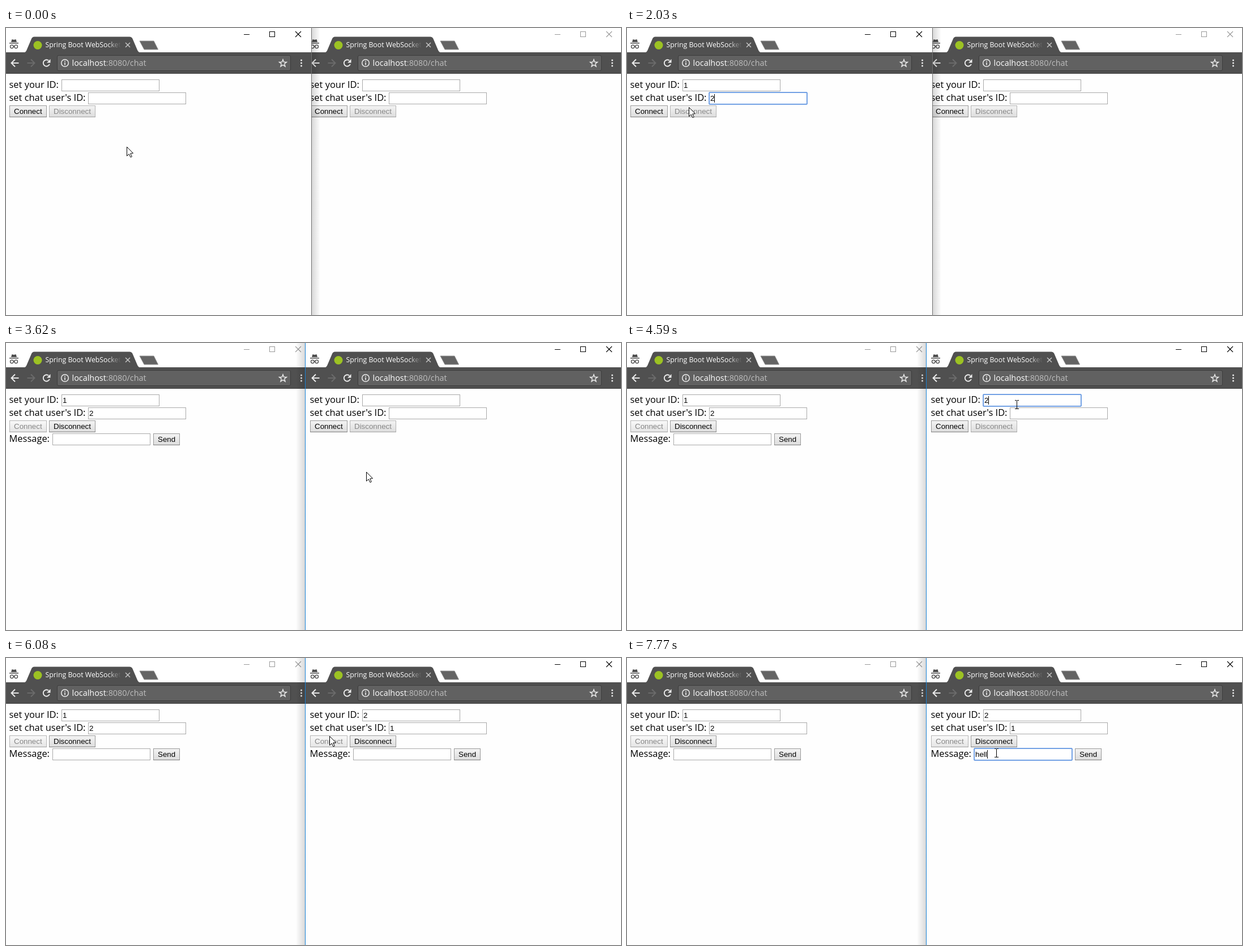
Recreate the animation shown at these times as an HTML page with a canvas. Size 1086 by 508 pixels, loop 8 s.

```html
<!DOCTYPE html>
<html lang="en">
<head>
<meta charset="utf-8">
<title>WebSocket chat</title>
<style>
html, body { margin: 0; width: 100%; height: 100%; overflow: hidden; background: #fff; }
canvas { display: block; width: 1086px; height: 508px; }
</style>
</head>
<body>
<canvas id="stage" width="1086" height="508"></canvas>
<script>
const ctx = document.getElementById('stage').getContext('2d', { alpha: false });
const LOOP = 8000, W = 1086, H = 508;
const UI = '"Open Sans", "Noto Sans", sans-serif';
const FORM = '13.333px "Liberation Sans", Arial, sans-serif';

// Pointer positions: time, x, y, shape. Each one holds until the next.
const pointer = [
  [0, 213, 210, 'arrow'], [150, 206, 166, 'arrow'], [270, 196, 122, 'beam'], [390, 191, 92, 'beam'],
  [670, 192, 107, 'beam'], [1360, 198, 121, 'beam'],
  [1900, 156, 134, 'arrow'], [2030, 109, 140, 'arrow'], [2180, 76, 145, 'arrow'],
  [2310, 54, 148, 'arrow'], [2440, 44, 149, 'arrow'], [2840, 90, 158, 'arrow'],
  [2960, 220, 184, 'arrow'], [3080, 352, 206, 'arrow'], [3230, 470, 219, 'arrow'],
  [3360, 572, 226, 'arrow'], [3490, 636, 228, 'arrow'],
  [3770, 656, 194, 'arrow'], [3910, 678, 142, 'arrow'], [4050, 688, 109, 'beam'],
  [4740, 691, 117, 'beam'], [4870, 695, 124, 'beam'],
  [5420, 660, 134, 'arrow'], [5550, 612, 137, 'arrow'], [5680, 584, 138, 'arrow'], [5810, 571, 138, 'arrow'],
  [6390, 606, 170, 'arrow'], [6540, 652, 168, 'beam']
];
// Focused field over time: window 0 or 1, then field name.
const focus = [[0, -1, ''], [820, 0, 'id'], [1640, 0, 'peer'], [2720, -1, ''],
  [4190, 1, 'id'], [5010, 1, 'peer'], [6080, -1, ''], [6690, 1, 'msg']];
const windows = [
  { o: 0, e: 0, left: 0, right: 540, id: [[0, ''], [950, '1']], peer: [[0, ''], [1770, '2']],
    msg: [[0, '']], hover: 2310, joined: 2720 },
  { o: 531, e: 549, left: 528, right: W, id: [[0, ''], [4470, '2']], peer: [[0, ''], [5290, '1']],
    msg: [[0, ''], [7350, 'h'], [7490, 'he'], [7630, 'hel'], [7770, 'hell']], hover: 5680, joined: 6080 }
];
const SWITCH = 3620;

function at(list, t) {
  let cur = list[0];
  for (const k of list) if (k[0] <= t) cur = k;
  return cur;
}
function rect(x, y, w, h, fill) { ctx.fillStyle = fill; ctx.fillRect(x, y, w, h); }
function frame(x, y, w, h, color) {
  ctx.strokeStyle = color; ctx.lineWidth = 1;
  ctx.strokeRect(x + .5, y + .5, w - 1, h - 1);
}
function text(s, x, y, font, fill) {
  ctx.font = font; ctx.fillStyle = fill;
  ctx.fillText(s, x, y);
}
function path(points, closed) {
  ctx.beginPath();
  for (let i = 0; i < points.length; i += 2) ctx.lineTo(points[i], points[i + 1]);
  if (closed) ctx.closePath();
}
function line(points, color, width = 1) {
  path(points); ctx.strokeStyle = color; ctx.lineWidth = width; ctx.stroke();
}
function poly(points, color) { path(points, true); ctx.fillStyle = color; ctx.fill(); }
function disc(x, y, r, color) {
  ctx.beginPath(); ctx.arc(x, y, r, 0, 7); ctx.fillStyle = color; ctx.fill();
}
function ring(x, y, r, color, width, from = 0, to = Math.PI * 2) {
  ctx.beginPath(); ctx.arc(x, y, r, from, to);
  ctx.strokeStyle = color; ctx.lineWidth = width; ctx.stroke();
}
function vGrad(y, h, top, bottom) {
  const g = ctx.createLinearGradient(0, y, 0, y + h);
  g.addColorStop(0, top); g.addColorStop(1, bottom);
  return g;
}

function tabStrip(o, e, active) {
  // spy glyph
  poly([o + 9, 25, o + 10.5, 20, o + 13, 20.7, o + 15, 20.7, o + 17.5, 20, o + 19, 25], '#4a4a4a');
  rect(o + 6, 26, 16, 1.5, '#4a4a4a');
  ring(o + 10.3, 33, 2.8, '#4a4a4a', 1.3);
  ring(o + 17.7, 33, 2.8, '#4a4a4a', 1.3);
  line([o + 13, 32.4, o + 15, 32.4], '#4a4a4a', 1.2);

  ctx.save();
  ctx.translate(o, 0);
  ctx.beginPath();
  ctx.moveTo(31, 44);
  ctx.quadraticCurveTo(35, 43, 36.5, 39);
  ctx.lineTo(45, 19);
  ctx.quadraticCurveTo(46.5, 15.5, 50, 15.5);
  ctx.lineTo(218, 15.5);
  ctx.quadraticCurveTo(222, 15.5, 223.5, 19);
  ctx.lineTo(232, 39);
  ctx.quadraticCurveTo(233.5, 43, 238, 44);
  ctx.fillStyle = '#505050'; ctx.fill();
  disc(56, 30.5, 7.5, '#9cc223');
  const fade = ctx.createLinearGradient(180, 0, 203, 0);
  fade.addColorStop(0, '#fff'); fade.addColorStop(1, 'rgba(255,255,255,0)');
  text('Spring Boot WebSocket', 69.5, 34, '12.3px ' + UI, fade);
  line([211, 26, 219, 34], '#c8c8c8', 1.5);
  line([219, 26, 211, 34], '#c8c8c8', 1.5);
  ctx.lineJoin = 'round';
  path([236, 23, 261, 23, 268.5, 38, 244, 38], true);
  ctx.fillStyle = '#646464'; ctx.fill();
  ctx.strokeStyle = '#8c8c8c'; ctx.lineWidth = 1; ctx.stroke();
  ctx.restore();

  const c = active ? '#000' : '#999';
  rect(e + 420, 11, 10, 1, c);
  frame(e + 465, 6, 10, 10, c);
  line([e + 511, 6, e + 521, 16], c, 1.1);
  line([e + 521, 6, e + 511, 16], c, 1.1);
}

function arrowIcon(x, dir, color) {
  line([x - 6.5 * dir, 62, x + 6 * dir, 62], color, 1.9);
  line([x, 55.5, x + 6.5 * dir, 62, x, 68.5], color, 1.9);
}

function toolbar(o, e, left, right) {
  rect(left, 43, right - left, 38, '#505050');
  rect(left, 80, right - left, 1, '#414141');
  const x = o + 90, w = e + 503 - x;
  ctx.beginPath(); ctx.roundRect(x + .5, 48.5, w - 1, 27, 2.5);
  ctx.fillStyle = '#616161'; ctx.fill();
  ctx.strokeStyle = '#3c3c3c'; ctx.lineWidth = 1; ctx.stroke();

  arrowIcon(o + 16, -1, '#eee');
  arrowIcon(o + 44, 1, '#6c6c6c');
  ring(o + 71.5, 62, 5.7, '#eee', 1.9, .35, 5.4);
  poly([o + 78.5, 55, o + 78.5, 61.5, o + 72, 61.5], '#eee');

  ring(o + 104, 62, 6.3, '#eee', 1.5);
  rect(o + 103.2, 61, 1.6, 4.6, '#eee');
  rect(o + 103.2, 58.2, 1.6, 1.7, '#eee');
  const font = '14.4px ' + UI;
  text('localhost', o + 116.5, 67, font, '#fff');
  const host = ctx.measureText('localhost').width;
  text(':8080/chat', o + 116.5 + host, 67, font, '#bdbdbd');

  const star = [];
  for (let i = 0; i < 10; i++) {
    const r = i % 2 ? 2.8 : 6.8, a = i * Math.PI / 5 - Math.PI / 2;
    star.push(e + 489 + r * Math.cos(a), 62.5 + r * Math.sin(a));
  }
  path(star, true);
  ctx.strokeStyle = '#eee'; ctx.lineWidth = 1.4; ctx.stroke();
  for (const y of [57, 62, 67]) disc(e + 521.5, y, 1.5, '#eee');
}

function field(x, y, value, focused, caret) {
  rect(x, y, 173, 21, '#fff');
  frame(x, y, 173, 21, '#a9a9a9');
  if (focused) {
    ctx.beginPath(); ctx.roundRect(x - .5, y - .5, 174, 22, 1.5);
    ctx.strokeStyle = '#86aee8'; ctx.lineWidth = 1; ctx.stroke();
    frame(x, y, 173, 21, '#5f94e0');
  }
  text(value, x + 2, y + 15, FORM, '#000');
  if (focused && caret) rect(Math.round(x + 2 + ctx.measureText(value).width), y + 3, 1, 15, '#000');
}

function button(label, x, y, w, enabled, hover) {
  rect(x, y, w, 21, vGrad(y, 21, hover ? '#fafafa' : '#f4f4f4', hover ? '#e4e4e4' : '#dcdcdc'));
  frame(x, y, w, 21, enabled ? (hover ? '#777' : '#999') : '#b4b4b4');
  rect(x, y + 20, w, 1, enabled ? '#7c7c7c' : '#a0a0a0');
  text(label, x + 8, y + 15, FORM, enabled ? '#000' : '#868686');
}

function page(win, index, t) {
  const o = win.o, font = '16.45px ' + UI;
  const [, owner, name] = at(focus, t);
  const has = n => owner === index && name === n;
  const joined = t >= win.joined;
  const caret = !(t >= 7220 && t < 7350);
  const row = (label, y, x, key) => {
    text(label, o + 5.5, y + 15, font, '#000');
    field(o + x, y, at(win[key], t)[1], has(key), caret);
  };
  row('set your ID:', 91, 98, 'id');
  row("set chat user's ID:", 114, 145, 'peer');
  button('Connect', o + 6, 137, 66, !joined, t >= win.hover);
  button('Disconnect', o + 76, 137, 82, joined);
  if (joined) {
    row('Message:', 160, 82, 'msg');
    button('Send', o + 260, 160, 47, true);
  }
}

function browser(index, t, active) {
  const win = windows[index], { o, e, left, right } = win;
  ctx.save();
  ctx.beginPath(); ctx.rect(left, 0, right - left, H); ctx.clip();
  rect(left, 0, right - left, H, '#fff');
  tabStrip(o, e, active);
  toolbar(o, e, left, right);
  rect(left, 81, right - left, H - 81, '#fefefe');
  page(win, index, t);
  ctx.restore();
}

function shadow(from, to) {
  const g = ctx.createLinearGradient(from, 0, to, 0);
  g.addColorStop(0, 'rgba(0,0,0,.15)'); g.addColorStop(1, 'rgba(0,0,0,.01)');
  rect(Math.min(from, to), 0, Math.abs(to - from), H, g);
}

function drawPointer(x, y, shape) {
  if (shape === 'beam') {
    rect(x, y - 7, 1, 15, '#000');
    for (const sy of [y - 8, y + 7]) { rect(x - 3, sy, 3, 1, '#000'); rect(x + 1, sy, 3, 1, '#000'); }
    return;
  }
  ctx.save();
  ctx.translate(x + .5, y + .5);
  path([0, 0, 0, 16, 3.7, 12.6, 6.5, 18.3, 8.8, 17.2, 6.2, 11.6, 11, 11.2], true);
  ctx.fillStyle = '#fff'; ctx.fill();
  ctx.strokeStyle = '#000'; ctx.lineWidth = 1; ctx.stroke();
  ctx.restore();
}

function draw(t) {
  const top = t < SWITCH ? 0 : 1;
  browser(1 - top, t, false);
  if (top === 0) shadow(540, 554); else shadow(528, 513);
  browser(top, t, true);
  if (top === 0) rect(539, 0, 1, H, '#707070');
  else rect(528, 0, 1, H, '#1883d7');
  const [, x, y, shape] = at(pointer, t);
  drawPointer(x, y, shape);
}

const start = performance.now();
function tick() {
  draw((performance.now() - start) % LOOP);
  requestAnimationFrame(tick);
}
tick();
</script>
</body>
</html>
```
